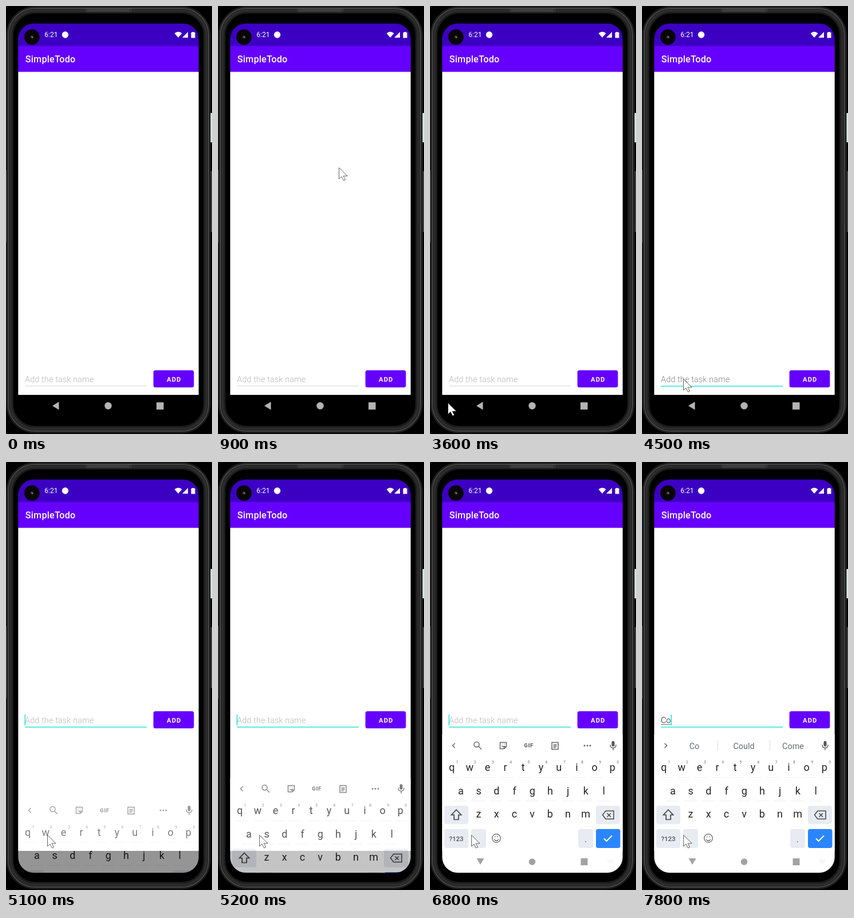
An HTML page for the animation above (8000 ms loop, 360 px wide and 744 px high).

```html
<!DOCTYPE html>
<html lang="en">
<head>
<meta charset="utf-8">
<title>Todo app</title>
<style>
  html, body { margin: 0; width: 100%; height: 100%; overflow: hidden; background: #000; }
  svg { display: block; width: 100%; height: 100%; font-family: Roboto, sans-serif; }
  .mid { text-anchor: middle; }
  .icon { fill: none; stroke: #666; stroke-width: 1.5; }
  .solid { fill: #666; }
  .cap { fill: #e8ebf1; }
  .letter { font-size: 18px; fill: #252525; text-anchor: middle; }
  .digit { font-size: 7px; fill: #777; text-anchor: middle; }
  .word { font-size: 14.4px; fill: #666b70; text-anchor: middle; }
</style>
</head>
<body>
<svg viewBox="0 0 360 744">
  <defs>
    <clipPath id="screen"><rect x="21.3" y="30.5" width="315.4" height="683.5" rx="27"/></clipPath>
  </defs>

  <!-- Phone body -->
  <rect width="360" height="744"/>
  <rect x="356" y="186" width="4" height="51" fill="#d5eadc"/>
  <rect x="355" y="288" width="4.5" height="104" fill="#222" stroke="#555"/>
  <rect y="285" width="1" height="126" fill="#777"/>
  <g fill="none">
    <rect x="1" y="1" width="356" height="741" rx="50" fill="#141414" stroke="#2c2c2c"/>
    <rect x="4" y="4" width="350" height="735" rx="47" stroke="#474747" stroke-width="2"/>
    <rect x="8" y="8" width="342" height="727" rx="43" stroke="#2b2b2b" stroke-width="5"/>
    <rect x="12" y="12" width="334" height="719" rx="39" fill="#000" stroke="#1c1c1c" stroke-width="2"/>
  </g>
  <rect x="139" y="5" width="80" height="5" rx="2.5" fill="#292929" stroke="#555" stroke-width=".8"/>
  <path d="M142 7.5H216" stroke="#666" stroke-width="2" stroke-dasharray="1 1"/>

  <!-- Screen -->
  <g clip-path="url(#screen)">
    <rect x="21" y="30" width="316" height="40" fill="#3c00c2"/>
    <rect x="21" y="69.5" width="316" height="45.5" fill="#6500ff"/>
    <rect x="21" y="114.5" width="316" height="561.5" fill="#fff"/>
    <g fill="#fff">
      <text x="67.3" y="54" font-size="12">6:21</text>
      <circle cx="103.5" cy="50" r="5.7"/>
      <path d="M294.5 47.5Q301 42 307.5 47.5L301 55ZM308 55L318 45V55ZM323.5 46H325.5V45H328.5V46H330.5V55.5H323.5Z"/>
      <text x="33.8" y="98.3" font-size="16.2" font-weight="500" letter-spacing=".2">SimpleTodo</text>
    </g>
    <g id="field">
      <text id="entry" x="33" y="654" font-size="14.4" font-weight="300"></text>
      <path id="composing" stroke="#444" stroke-width=".8"/>
      <rect id="line" x="33" width="213"/>
      <rect id="caret" y="639" width="1.6" height="19" fill="#20e6d8"/>
      <rect x="257.6" y="633.3" width="70.8" height="29.7" rx="3.5" fill="#6500ff"/>
      <text x="293.7" y="652.5" class="mid" font-size="11.2" font-weight="700" letter-spacing="1.1" fill="#fff">ADD</text>
    </g>
    <g id="navDark" fill="#b4b4b4">
      <path d="M81 695L92.5 688V702ZM263 689H275.5V701.5H263Z"/>
      <circle cx="178.5" cy="695" r="6.2"/>
    </g>
    <g id="keyboard">
      <rect x="21" y="474" width="316" height="320" fill="#fff"/>
      <path d="M30 548.5H330M42 589H315" stroke="#f0f0f0" stroke-dasharray="23 8.2"/>
      <g id="tools" class="icon">
        <path d="M43.5 489L39.5 493L43.5 497"/>
        <circle cx="81.5" cy="491" r="4.5"/><path d="M85 494.5L90 499.5"/>
        <path d="M122.5 487.5H133.5V495L129.5 498.5H122.5ZM133.5 495H129.5V498.5M125.5 493.5Q128 496 130.5 493.5M125.5 490.5H126.5M129.5 490.5H130.5"/>
        <text x="172.5" y="496" class="mid solid" stroke="none" font-size="9.5" font-weight="900" letter-spacing=".6">GIF</text>
        <path d="M213 487.5H224V499.5H213ZM216 487.5H221M215.5 491.5H221.5M215.5 494H221.5M215.5 496.5H219.5"/>
        <path d="M270 493H270.01M275 493H275.01M280 493H280.01" stroke-width="3" stroke-linecap="round"/>
      </g>
      <g id="suggestions">
        <path class="icon" d="M39.5 489L43.5 493L39.5 497"/>
        <path d="M132.5 484V502M223.5 484V502" stroke="#ddd"/>
        <text class="word" x="91.5" y="499"></text>
        <text class="word" x="178" y="499"></text>
        <text class="word" x="264" y="499"></text>
      </g>
      <rect x="317.5" y="485" width="5" height="9.5" rx="2.5" fill="#555"/>
      <path class="icon" d="M315 491.5Q315 497 320 497T325 491.5M320 497V501"/>
      <g id="letters"></g>
      <g class="cap">
        <rect x="25" y="597.5" width="42" height="32" rx="4"/>
        <rect x="290" y="597.5" width="42" height="32" rx="4"/>
        <rect x="25" y="638" width="42" height="33" rx="4"/>
        <rect x="72" y="638" width="26" height="33" rx="4"/>
        <rect x="259" y="638" width="26" height="33" rx="4"/>
      </g>
      <rect x="290" y="638" width="42.5" height="33" rx="4" fill="#2a86ff"/>
      <path d="M304 654.5L308.5 659L318 649.5" fill="none" stroke="#fff" stroke-width="2"/>
      <path id="shift" d="M46 604.5L54.5 613.5H50V621.5H42V613.5H37.5Z" fill="none" stroke="#444" stroke-width="1.7"/>
      <path d="M307 606.5H321V620.5H307L301.5 613.5ZM309.5 610.5L316 617M316 610.5L309.5 617" fill="none" stroke="#444" stroke-width="1.5"/>
      <text x="46" y="658.5" class="mid" font-size="11.5" font-weight="500" fill="#555">?123</text>
      <text x="272" y="661" class="mid" font-size="16" fill="#555">.</text>
      <circle class="icon" cx="116" cy="654" r="7.3" style="stroke-width:1.3"/>
      <path class="icon" d="M112 656Q116 661 120 656M113 651.5H114.5M117.5 651.5H119" style="stroke-width:1.3"/>
      <g id="navLight" fill="#a2a2a2">
        <path d="M81.5 689H94.5L88 700ZM263.5 689H275.5V701H263.5Z"/>
        <circle cx="178.5" cy="695" r="5.8"/>
        <path d="M310 692H321M310 694.5H321M312 697H319" stroke="#ddd" stroke-width="1.2" stroke-dasharray="1.2 1"/>
      </g>
    </g>
  </g>
  <circle cx="45.3" cy="54" r="13.4" fill="#080606"/>
  <circle cx="45.3" cy="54" r="3" fill="#2c251c"/>
  <path d="M44.5 53L47 55" stroke="#aaa096" stroke-width="1.3"/>
  <path id="cursor" d="M.5 .5V20L5 16L8.5 23L11.5 21.5L8 15H15Z" fill="#fff" stroke="#222" stroke-width=".7"/>
</svg>
<script>
const LOOP = 8000, STEP = 100;
const $ = id => document.getElementById(id);
const set = (node, attrs) => { for (const name in attrs) node.setAttribute(name, attrs[name]); };
const show = (node, on) => { node.style.display = on ? '' : 'none'; };
const progress = (t, from, to) => Math.min(1, Math.max(0, (t - from) / (to - from)));
const mix = (a, b, p) => a + (b - a) * p;
const easeOut = p => 1 - (1 - p) ** 2;

function addText(className, x, y, text) {
  const node = document.createElementNS('http://www.w3.org/2000/svg', 'text');
  set(node, { class: className, x, y });
  node.textContent = text;
  $('letters').append(node);
  return node;
}

const keys = [['qwertyuiop', 38, 537], ['asdfghjkl', 54, 577.5], ['zxcvbnm', 85, 618]]
  .flatMap(([row, left, y]) => [...row].map((letter, i) =>
    ({ letter, node: addText('letter', left + i * 31.2, y, letter) })));
[...'1234567890'].forEach((digit, i) => addText('digit', 47.5 + i * 31.2, 524, digit));
const words = [...document.querySelectorAll('.word')];

function cursorAt(t) {
  if (t >= 400 && t < 2500) {
    const p = easeOut(progress(t, 400, 900));
    return [mix(244, 211, p), mix(360, 280.5, p)];
  }
  if (t >= 3600) {
    const p = easeOut(progress(t, 3600, 4200));
    return [mix(31, 72, p), mix(689.5, 648, p)];
  }
  return null;
}

function drawField(t, typed) {
  const focused = t >= 4500;
  const end = 33 + (typed ? $('entry').getComputedTextLength() : 0);
  const blinkOn = Math.floor((t - 4800) / 500) % 2 === 0;
  set($('field'), { transform: `translate(0 ${t >= 5000 ? -200 : 0})` });
  set($('line'), { y: 660, height: focused ? 1.5 : 1, fill: focused ? '#2be6d6' : '#d6d6d6' });
  set($('composing'), { d: `M33 656.5H${end}` });
  show($('composing'), typed);
  set($('caret'), { x: typed ? end : 32.5 });
  show($('caret'), t >= 4700 && (t < 4800 || blinkOn || typed));
}

function render(t) {
  const typed = t >= 7800 ? 'Co' : t >= 7600 ? 'C' : '';
  const hintColor = t >= 4500 && t < 5000 ? '#858585' : '#b8b8b8';
  $('entry').textContent = typed || 'Add the task name';
  set($('entry'), { fill: typed ? '#222' : hintColor, 'letter-spacing': typed ? 0 : 0.15 });
  drawField(t, typed);

  const rise = progress(t, 5000, 5400);
  const caps = t >= 7500 && t < 7600;
  const suggesting = t >= 7700;
  show($('keyboard'), t >= 5000);
  show($('navDark'), t < 5000);
  show($('navLight'), rise === 1);
  set($('keyboard'), {
    transform: `translate(0 ${150 * (1 - rise)})`,
    opacity: Math.min(1, 0.4 + 0.74 * rise)
  });
  for (const { letter, node } of keys) node.textContent = caps ? letter.toUpperCase() : letter;
  set($('shift'), { fill: caps ? '#444' : 'none' });
  show($('tools'), !suggesting);
  show($('suggestions'), suggesting);
  const choices = typed === 'Co' ? ['Co', 'Could', 'Come'] : ['C', 'Can', 'Call'];
  words.forEach((node, i) => { node.textContent = choices[i]; });

  const position = cursorAt(t);
  show($('cursor'), position);
  if (position) set($('cursor'), { transform: `translate(${position})` });
}

const start = performance.now();
function tick() {
  const t = (performance.now() - start) % LOOP;
  render(Math.floor(t / STEP) * STEP);
  requestAnimationFrame(tick);
}
tick();
</script>
</body>
</html>
```
